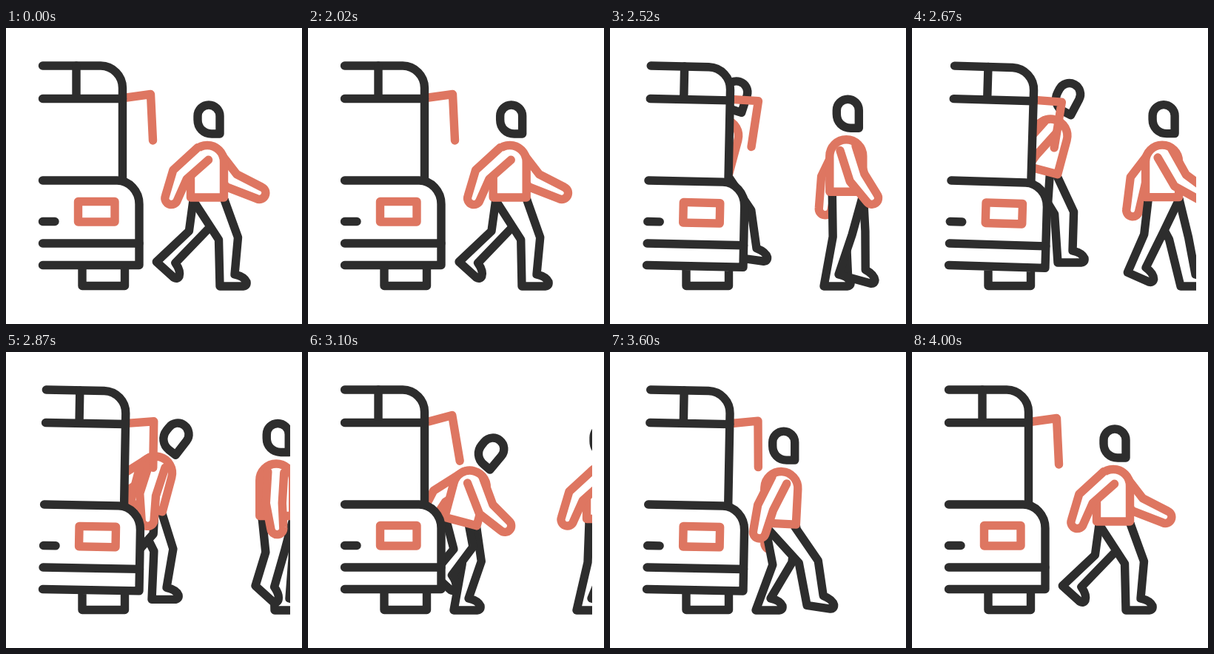
These frames come from a looping animation (400x400 px, 4.02 s). An HTML page with a canvas:

```html
<!DOCTYPE html>
<html lang="en">
<head>
<meta charset="utf-8">
<title>Leaving the bus</title>
<style>
html, body { margin: 0; width: 100%; height: 100%; overflow: hidden; background: #fff; }
canvas { display: block; width: 400px; height: 400px; }
</style>
</head>
<body>
<canvas id="stage" width="400" height="400"></canvas>
<script>
const ctx = document.getElementById('stage').getContext('2d');
const DARK = '#2d2d2d', CORAL = '#de7661';
const LOOP = 4020, REST = 2000, MOVE = 2000;
const RAD = Math.PI / 180;
const GROUND = 349, STRIDE = 166;

const BUS = {
  roof: 'M49.5 51H128a30 30 0 0 1 29.5 30V206',
  body: 'M49.5 206H150a30 32 0 0 1 30 32V320.5H49.5',
  trim: 'M49.5 95.5H157.5M95 51V95M49.5 291H180M49.5 261.5H66',
  cover: 'M0 51H128a30 30 0 0 1 29.5 30V210H0Z M0 206H150a30 32 0 0 1 30 32V320H160V326H0Z',
  plate: 'M97.5 234.5H147V262H97.5Z',
  wheel: 'M103 322V348.5H160.5V322',
  mirror: 'M163 94L195.5 89.5L198.5 152'
};
for (const key in BUS) BUS[key] = new Path2D(BUS[key]);
const HEAD = new Path2D('M15 19H4C-7 19 -15 11 -15 0V-5a15 15 0 0 1 30 0Z');
const TORSO = new Path2D('M-22.5 0H22.5V-48a22.5 22.5 0 0 0 -45 0Z');

const clamp = u => Math.min(1, Math.max(0, u));
const mix = (a, b, u) => a + (b - a) * u;
const wave = turns => Math.cos(turns * 2 * Math.PI);

// Smooth rise from 0 to 1 between two times
function ramp(t, from, to) {
  const u = clamp((t - from) / (to - from));
  return u * u * (3 - 2 * u);
}

// Smooth rise and fall between two times
function bump(t, from, to) {
  return Math.sin(Math.PI * clamp((t - from) / (to - from))) ** 2;
}

// Turns local points around an origin into stage coordinates
function placer(ox, oy, deg) {
  const c = Math.cos(deg * RAD), s = Math.sin(deg * RAD);
  return (x, y) => [ox + x * c - y * s, oy + x * s + y * c];
}

function paint(path, color, fill) {
  if (fill) {
    ctx.fillStyle = '#fff';
    ctx.fill(path);
  }
  ctx.strokeStyle = color;
  ctx.stroke(path);
}

function paintAt(path, color, [x, y], deg) {
  ctx.save();
  ctx.translate(x, y);
  ctx.rotate(deg * RAD);
  paint(path, color, true);
  ctx.restore();
}

// A foot stands still, rolls onto its toe, then swings one stride ahead
function footAt(phase, base, rise) {
  const step = Math.floor(phase);
  const swing = clamp((phase - step - 0.43) / 0.48);
  const lift = clamp(7 * swing) * clamp(2.4 * (1 - swing));
  return {
    x: base + STRIDE * (step + swing ** 1.7),
    y: GROUND - 33 * lift - rise,
    angle: 42 * lift
  };
}

function drawLeg(foot, waist, bend, inset) {
  const at = placer(foot.x, foot.y, foot.angle);
  const hip = waist(0, 3), ankle = at(10, -12);
  const kneeX = (hip[0] + ankle[0]) / 2 + bend, kneeY = (hip[1] + ankle[1]) / 2;
  const path = new Path2D();
  path.moveTo(...waist(-19, 4));
  path.lineTo(kneeX - 13, kneeY + 1.5);
  path.lineTo(...at(0, 0));
  path.lineTo(...at(32, 0));
  path.quadraticCurveTo(...at(37, -1), ...at(36, -6));
  path.quadraticCurveTo(...at(33, -13), ...at(20, -16));
  path.lineTo(kneeX + 13, kneeY - 1.5);
  path.lineTo(...waist(23 - inset, 3));
  paint(path, DARK, true);
}

// Arm angles are measured from straight down, positive forward
function drawArm(upper, swing, lean, waist, upperLen, foreLen) {
  const fore = upper + 10 + 18 * wave(swing) ** 2;
  const go = ([x, y], deg, len) =>
    [x + Math.sin(deg * RAD) * len, y + Math.cos(deg * RAD) * len];
  const side = (p, deg, width) => go(p, deg + 90, width);
  const mid = (upper + fore) / 2;
  const shoulder = waist((upper + lean) * 0.12, -59);
  const elbow = go(shoulder, upper, upperLen);
  const wrist = go(elbow, fore, foreLen);
  const path = new Path2D();
  path.moveTo(...side(shoulder, upper, -11));
  path.lineTo(...side(elbow, mid, -11));
  path.lineTo(...side(wrist, fore, -8.5));
  path.arc(...wrist, 8.5, (180 - fore) * RAD, -fore * RAD, true);
  path.lineTo(...side(elbow, mid, 11));
  path.lineTo(...side(shoulder, upper, 11));
  paint(path, CORAL, true);
}

function drawPerson(p) {
  const waist = placer(p.x, p.y, p.lean);
  drawArm(p.farArm, p.swing, p.lean, waist, 46, 41);
  drawLeg(footAt(p.phase + 0.5, 197, p.farRise), waist, p.bend, 0);
  drawLeg(footAt(p.phase, 289, p.nearRise), waist, p.bend, p.lean * 0.7);
  paintAt(TORSO, CORAL, [p.x, p.y], p.lean);
  paintAt(HEAD, DARK, placer(...waist(0, -75), p.tilt)(2, -30), p.tilt);
  drawArm(p.nearArm, p.swing, p.lean, waist, 42, 34);
}

const nearSwing = swing => -9 - 39 * wave(swing);
const farSwing = swing => 38 * wave(swing);

// Sets off from the rest pose and walks out of view
function walker(t) {
  const phase = 0.9 * (t / 1100) ** 1.32, swing = phase * 1.1;
  return {
    phase, swing,
    x: 272 + 141 * phase,
    y: 229 - 10.5 * Math.sin(phase * 2 * Math.PI) ** 2,
    lean: 0, tilt: 0, nearRise: 0, farRise: 0,
    bend: 15 - 10 * ramp(t, 0, 350),
    nearArm: nearSwing(swing),
    farArm: farSwing(swing)
  };
}

// Steps down from the bus, holding on, and arrives in the rest pose
function rider(t) {
  const left = MOVE - t;
  const phase = -0.9 * (left / MOVE) ** 1.2, swing = phase * 1.4;
  const lean = 15 * (1 - ramp(t, 1100, 1800));
  const grip = mix(34, -58, ramp(t, 350, 670));
  return {
    phase, swing, lean,
    x: 272 - 0.073 * left - 0.17 * Math.max(0, 670 - t) - 14 * bump(t, 1200, 2000),
    y: 229 - 37 * (1 - ramp(t, 670, 1080)) + 3 * bump(t, 1200, 2000),
    tilt: 40 * (ramp(t, 100, 1000) - ramp(t, 1100, 1600)),
    nearRise: 32 * (1 - ramp(t, 850, 1350)),
    farRise: 32 * (1 - ramp(t, 670, 1050)),
    bend: 15,
    nearArm: mix(-42, nearSwing(swing) - lean * 0.6, ramp(t, 700, 1050)),
    farArm: mix(grip, farSwing(swing), ramp(t, 1100, 2000))
  };
}

function turnAbout(x, y, deg) {
  ctx.translate(x, y);
  ctx.rotate(deg * RAD);
  ctx.translate(-x, -y);
}

function drawBus(t) {
  const tilt = 1.7 * bump(t, 240, 1120) - 0.9 * bump(t, 1120, 1420) + 1.1 * bump(t, 1420, 1800);
  const flap = 11.3 * bump(t, 200, 1000) - 8 * bump(t, 950, 1350) + 1.3 * bump(t, 1400, 1800);
  paint(BUS.wheel, DARK);
  ctx.save();
  turnAbout(49, 321, tilt);
  ctx.fillStyle = '#fff';
  ctx.fill(BUS.cover);
  ctx.save();
  turnAbout(162, 94, flap);
  paint(BUS.mirror, CORAL);
  ctx.restore();
  paint(BUS.plate, CORAL);
  for (const part of [BUS.roof, BUS.body, BUS.trim]) paint(part, DARK);
  ctx.restore();
}

function draw(ms) {
  const t = Math.max(0, Math.min(MOVE, ms % LOOP - REST));
  ctx.fillStyle = '#fff';
  ctx.fillRect(0, 0, 400, 400);
  ctx.save();
  ctx.beginPath();
  ctx.rect(16, 16, 368, 368);
  ctx.clip();
  ctx.lineWidth = 11.4;
  ctx.lineCap = ctx.lineJoin = 'round';
  drawPerson(walker(t));
  if (t > 0) drawPerson(rider(t));
  drawBus(t);
  ctx.restore();
}

const start = performance.now();
function tick() {
  draw(performance.now() - start);
  requestAnimationFrame(tick);
}
tick();
</script>
</body>
</html>
```
